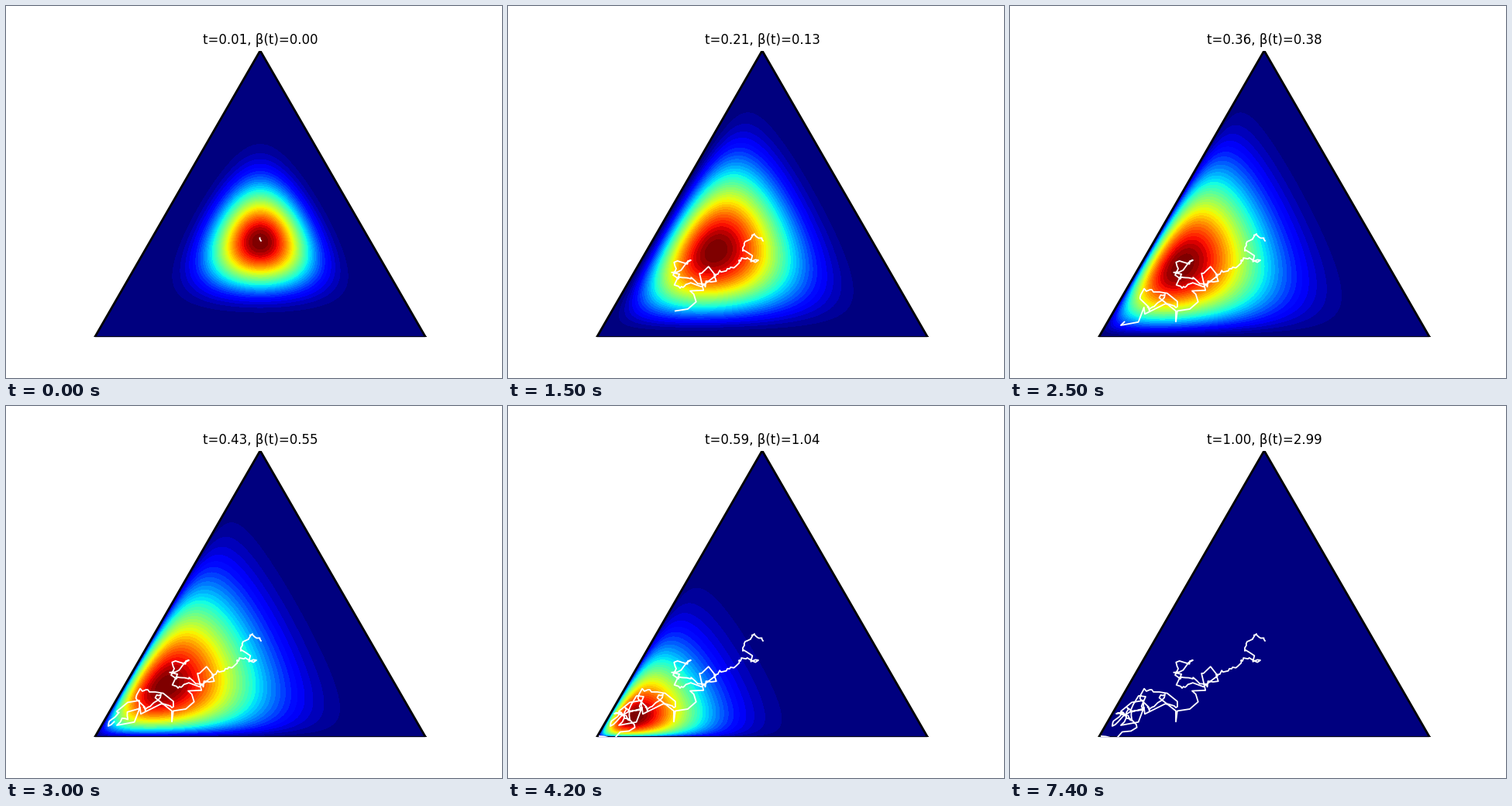
A matplotlib script for the animation above (7500 ms loop, 640 by 480 pixels).

```python
import numpy as np
import matplotlib.pyplot as plt
from matplotlib.animation import FuncAnimation
from matplotlib.patches import Polygon, Rectangle

W, H, FRAMES = 640, 480, 75
SIDE, LEFT, TOP, BASE = 426.8, 114.6, 57.6, 427.2
HEIGHT = BASE - TOP
CORNERS = np.array([(LEFT, BASE), (LEFT + SIDE, BASE), (LEFT + SIDE / 2, TOP)])
BANDS = 38

# frame, time, Dirichlet parameters; in between everything is linear
KEYS = np.array([
    (0, 0.010, 6.0, 6.0, 6.0),
    (10, 0.141, 4.2, 3.06, 3.2),
    (20, 0.2825, 4.45, 1.79, 2.87),
    (30, 0.428, 4.5, 1.64, 1.89),
    (42, 0.589, 7.5, 1.62, 1.54),
    (57, 0.7705, 60, 0.05, 0.05),
    (74, 0.9985, 60, 0.05, 0.05),
])

# Main turns of the random walk; the detail between them is fractal
TURNS = np.array([
    (329, 303), (318, 294), (313, 301), (303, 316), (323, 328), (300, 329),
    (283, 339), (262, 356), (236, 352), (220, 352), (236, 328), (222, 364),
    (268, 348), (232, 391), (200, 372), (180, 394), (176, 368), (216, 388),
    (143, 412), (172, 380), (132, 413), (175, 375), (150, 402), (137, 397),
    (163, 411), (118, 426),
], float)
WALK_FRAMES = 42


def state(i):
    """Time and Dirichlet parameters of a frame."""
    return np.array([np.interp(i, KEYS[:, 0], col) for col in KEYS.T[1:]])


def roughen(pts, rounds, rng):
    """Split every piece at a randomly displaced midpoint, repeatedly."""
    for _ in range(rounds):
        length = np.hypot(*np.diff(pts, axis=0).T)
        mid = (pts[:-1] + pts[1:]) / 2
        room = np.clip(np.hypot(*(mid - CORNERS[0]).T) / 60, 0, 1)
        mid += rng.standard_normal(mid.shape) * (0.25 * length * room)[:, None]
        out = np.empty((2 * len(pts) - 1, 2))
        out[::2], out[1::2] = pts, mid
        pts = out
    return pts


walk = roughen(TURNS, 3, np.random.default_rng(7))

# Barycentric coordinates of the pixel centres around the triangle
X0, X1, Y0, Y1 = 112, 545, 56, 430
px, py = np.meshgrid(np.arange(X0, X1) + 0.5, np.arange(Y0, Y1) + 0.5)
b3 = (BASE - py) / HEIGHT
b2 = (px - LEFT) / SIDE - b3 / 2
log_b = np.log(np.clip([1 - b2 - b3, b2, b3], 1e-3, 1))
COLORS = plt.get_cmap("jet")(np.linspace(0, 1, BANDS))


def density(alpha):
    """Filled contour bands of the Dirichlet density, relative to its peak."""
    logp = np.tensordot(alpha - 1, log_b, 1)
    rel = np.exp(logp - logp.max())
    return COLORS[np.minimum((rel * BANDS).astype(int), BANDS - 1)]


fig = plt.figure(figsize=(W / 100, H / 100), dpi=100, facecolor="white")
ax = fig.add_axes([0, 0, 1, 1])
img = ax.imshow(density(state(0)[1:]), extent=(X0, X1, Y1, Y0),
                interpolation="nearest", aspect="auto")
ax.set(xlim=(0, W), ylim=(H, 0))
ax.axis("off")
img.set_clip_path(Polygon(CORNERS, transform=ax.transData))

edges = [ax.plot(*zip(p, q), color="black", lw=2)[0]
         for p, q in zip(CORNERS, np.roll(CORNERS, -1, axis=0))]
trail, = ax.plot([], [], color="white", lw=1.3)
view = Rectangle((80, TOP), 496, HEIGHT, transform=ax.transData)
for line in (*edges, trail):
    line.set_clip_path(view)
title = ax.text(LEFT + SIDE / 2, 49.3, "", ha="center", va="baseline",
                fontsize=12, family="DejaVu Sans")


def update(i):
    t, *alpha = state(i)
    title.set_text(f"t={t:.2f}, β(t)={3 * t * t:.2f}")
    img.set_data(density(np.array(alpha)))
    # the walk slows down as it nears the corner
    done = min(i / WALK_FRAMES, 1) ** 0.62
    trail.set_data(walk[:max(3, round(done * len(walk)))].T)
    return img, trail, title


anim = FuncAnimation(fig, update, frames=FRAMES, interval=100, repeat=True,
                     repeat_delay=0, blit=False)
plt.show()
```
